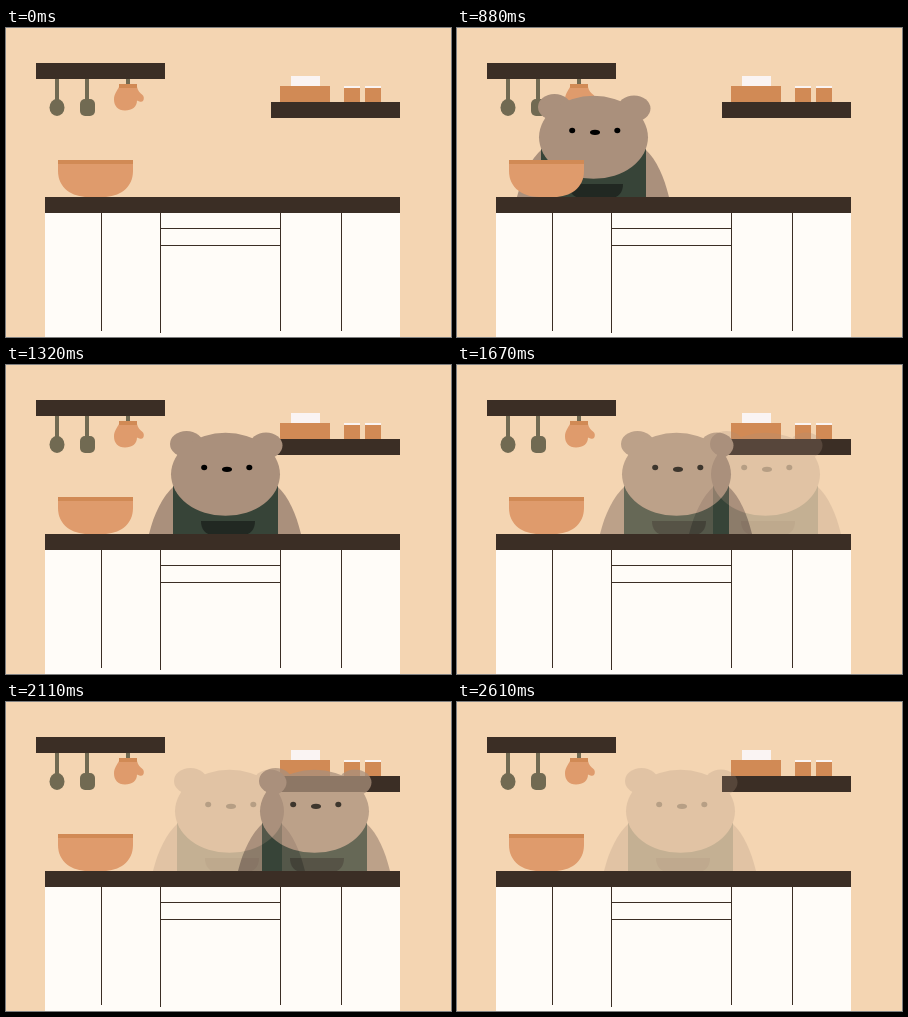
These frames come from a looping animation (445x309 px, 2.64 s). An HTML page:

```html
<!DOCTYPE html>
<html lang="en">
<head>
<meta charset="utf-8">
<title>Bear in the kitchen</title>
<style>
  html, body { margin: 0; height: 100%; overflow: hidden; background: #f4d5b2; }
  svg { display: block; width: 100%; height: 100%; }
  .dark { fill: #3b2e25; }
  .olive { fill: #716a52; }
  .clay { fill: #d18a55; }
  .peach { fill: #df9b6c; }
  .fur { fill: #aa907c; }
</style>
</head>
<body>
<svg viewBox="0 0 445 309">
  <defs>
    <g id="wall">
      <path fill="#f4d5b2" d="M0 0H445V309H0z"/>
      <path class="dark" d="M30 35H159V51H30zM265 74H394V90H265z"/>
      <g class="olive">
        <path d="M49 51h4v22h-4zM79 51h4v22h-4zM120 51h4v6h-4z"/>
        <ellipse cx="51" cy="79.5" rx="7.5" ry="8.5"/>
        <rect x="74" y="71" width="15" height="17" rx="5"/>
      </g>
      <path class="peach" d="M113 59H131C132 63 134 65 136 66.500C138 68 138.500 71 137 73C135.500 74.500 133 73.500 131 72.500C131 79 126 82.500 119 82.500C112 82.500 108 78 108 71.500C108 66 111 63 113 59z"/>
      <path class="clay" d="M113 56h18v4h-18zM274 58h50v16h-50zM338 60h16v14h-16zM359 60h16v14h-16z"/>
      <path fill="#faf4f3" d="M285 48h29v10h-29zM338 58h16v2h-16zM359 58h16v2h-16z"/>
    </g>
    <g id="bear">
      <path class="fur" d="M168 121C156 132 148 149 143 169H295C290 149 283 132 271 121z"/>
      <path fill="#374438" d="M167 121H272V170H167z"/>
      <path fill="#212822" d="M195 156H249C249 164 245 170 236 170H208C199 170 195 164 195 156z"/>
      <g class="fur">
        <ellipse cx="180.500" cy="79" rx="16.500" ry="13"/>
        <ellipse cx="260" cy="80.500" rx="16.500" ry="13"/>
        <ellipse cx="219.500" cy="109.300" rx="54.500" ry="41.500"/>
      </g>
      <ellipse cx="198.200" cy="102.500" rx="3" ry="2.700"/>
      <ellipse cx="243.300" cy="102.500" rx="3" ry="2.700"/>
      <ellipse cx="221" cy="104.300" rx="5" ry="2.600"/>
    </g>
  </defs>

  <use href="#wall"/>
  <use href="#bear" id="now"/>
  <g id="fade">
    <use href="#wall"/>
    <use href="#bear" id="next"/>
  </g>

  <path class="peach" d="M52 135H127V143C127 160 113 169 97 169H82C66 169 52 160 52 143z"/>
  <path class="clay" d="M52 132h75v4H52z"/>
  <path fill="#fffcf8" d="M39 185H394V309H39z"/>
  <path class="dark" d="M39 169H394V185H39z"/>
  <path fill="none" stroke="#3b2e25" d="M95.500 185V303M154.500 185V305M274.500 185V303M335.500 185V303M154 200.500H275M154 217.500H275"/>
</svg>
<script>
  const HOLD = 350, STEP = 30, STEPS = 4, BEAT = HOLD + STEP * (STEPS - 1);
  // Bear offset in each pose; null means no bear.
  const poses = [null, [0, 56], [-83, 0], [0, 0], [89, 0], [4, 0]];
  const [now, next, fade] = ['now', 'next', 'fade'].map(id => document.getElementById(id));

  function place(bear, pose) {
    bear.style.display = pose ? '' : 'none';
    if (pose) bear.setAttribute('transform', `translate(${pose})`);
  }

  function draw() {
    const t = performance.now() % (BEAT * poses.length);
    const i = Math.floor(t / BEAT), late = t % BEAT - HOLD;
    place(now, poses[i]);
    place(next, poses[(i + 1) % poses.length]);
    fade.setAttribute('opacity', late < 0 ? 0 : (Math.floor(late / STEP) + 1) / STEPS);
    requestAnimationFrame(draw);
  }
  draw();
</script>
</body>
</html>
```
